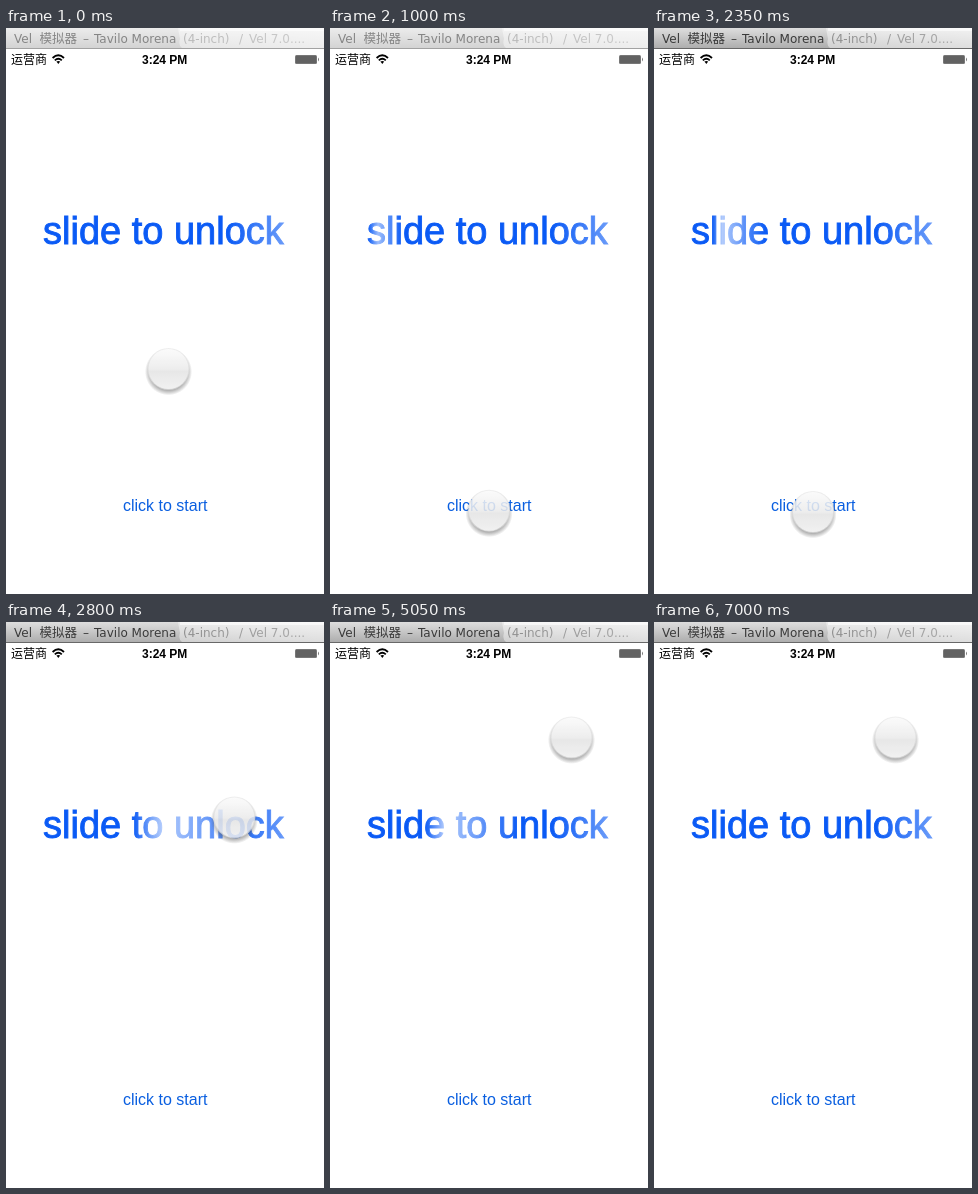
Recreate the animation shown at these times as an HTML page. Size 318 by 566 pixels, loop 7.45 s.

```html
<!DOCTYPE html>
<html lang="zh-CN">
<head>
<meta charset="utf-8">
<title>Slide to unlock</title>
<style>
  html, body { margin: 0; width: 100%; height: 100%; overflow: hidden; background: #fff; }
  svg { position: absolute; left: 0; top: 0; }
  text { font-family: "Liberation Sans", Arial, sans-serif; white-space: pre; }
  .bar text { font: 12px "DejaVu Sans", sans-serif; fill: #858585; }
  .bar .cjk { font: 12.5px "Noto Sans CJK SC", sans-serif; }
  .bar .top { stop-color: #ececec; }
  .bar .low { stop-color: #d2d2d2; }
  .bar .edge { fill: #a2a2a2; }
  .active text { fill: #3a3a3a; }
  .active .top { stop-color: #dedede; }
  .active .low { stop-color: #ababab; }
  .active .edge { fill: #686868; }
  .carrier { font: 12px "Noto Sans CJK SC", sans-serif; }
  .clock { font-size: 12px; font-weight: bold; }
  .start { font-size: 16px; fill: #0a5fe0; }
  .slide { font-size: 38px; fill: url(#shine); stroke: url(#shine); stroke-width: .9; }
</style>
</head>
<body>
<svg width="318" height="566" viewBox="0 0 318 566">
  <defs>
    <linearGradient id="shine" gradientUnits="userSpaceOnUse" x1="38" y1="0" x2="280" y2="0"></linearGradient>
    <linearGradient id="veil" x1="0" x2="1">
      <stop offset="0" stop-color="#fff" stop-opacity=".42"/>
      <stop offset="1" stop-color="#fff" stop-opacity=".6"/>
    </linearGradient>
    <linearGradient id="face" x1="0" y1="0" x2="0" y2="1">
      <stop offset="0" stop-color="#fbfbfb"/>
      <stop offset=".5" stop-color="#ebebeb"/>
      <stop offset=".56" stop-color="#e4e4e4"/>
      <stop offset="1" stop-color="#efefef"/>
    </linearGradient>
    <linearGradient id="rim" x1="0" y1="0" x2="0" y2="1">
      <stop offset="0" stop-color="#ececec"/>
      <stop offset="1" stop-color="#c6c6c6"/>
    </linearGradient>
    <radialGradient id="shadow">
      <stop offset=".76" stop-color="#555" stop-opacity=".6"/>
      <stop offset="1" stop-color="#555" stop-opacity="0"/>
    </radialGradient>
  </defs>

  <g class="bar" id="bar">
    <linearGradient id="metal" x1="0" y1="0" x2="0" y2="1">
      <stop class="top" offset="0"/>
      <stop class="low" offset="1"/>
    </linearGradient>
    <rect width="318" height="21" fill="url(#metal)"/>
    <rect class="edge" y="20" width="318" height="1"/>
    <text x="8" y="15">Vel</text>
    <text class="cjk" x="33.5" y="15">模拟器</text>
    <text x="77" y="15">–</text>
    <text x="88" y="15">Tavilo Morena</text>
    <text x="177" y="15">(4-inch)</text>
    <text x="233" y="15">/</text>
    <text x="243" y="15">Vel 7.0....</text>
    <path d="M172 0H318V20H176Q172 17 174 11Z" fill="url(#veil)"/>
    <rect x="174" width="144" height="3" fill="#fff" opacity=".6"/>
  </g>

  <text class="carrier" x="5" y="36">运营商</text>
  <g fill="none" stroke="#000" stroke-width="1.8">
    <path d="M46.6 30Q52.3 24.6 58 30"/>
    <path d="M48.8 32.4Q52.3 29.2 55.8 32.4"/>
    <path d="M50.4 33.6L52.3 36L54.2 33.6Q52.3 32.2 50.4 33.6Z" fill="#000" stroke="none"/>
  </g>
  <text class="clock" x="136" y="35.5">3:24 PM</text>
  <rect x="289" y="27" width="22" height="9" rx="1.5" fill="#777"/>
  <rect x="290" y="28" width="20" height="7" fill="#626262"/>
  <path d="M312 29.5q2 2 0 4z" fill="#777"/>

  <text class="slide" x="37" y="215.5">slide to unlock</text>
  <text class="start" x="117" y="483">click to start</text>

  <g id="ball" opacity=".86">
    <circle cy="2.8" r="23.6" fill="url(#shadow)"/>
    <circle r="21" fill="url(#rim)"/>
    <circle r="20" fill="url(#face)"/>
  </g>
</svg>
<script>
  const LOOP = 7450, HOLD = 7000, STEP = 50;
  // Each cycle: one pass of rest, then two passes of the band.
  const PASS = 1230, CYCLE = 3 * PASS, LEAD = 260;
  const STOPS = 48, BLUE = [10, 90, 245];
  const bar = document.getElementById("bar");
  const ball = document.getElementById("ball");
  const shine = document.getElementById("shine");
  const clamp = v => Math.max(0, Math.min(1, v));

  const stops = Array.from({ length: STOPS + 1 }, (_, i) => {
    const stop = document.createElementNS("http://www.w3.org/2000/svg", "stop");
    stop.setAttribute("offset", i / STOPS);
    return shine.appendChild(stop);
  });

  // Underdamped step response: 0 before start, settling at 1.
  function spring(ms) {
    if (ms <= 0) return 0;
    const s = ms / 1000, zeta = 0.6, w = 8, damped = w * Math.sqrt(1 - zeta * zeta);
    const wave = Math.cos(damped * s) + zeta * w / damped * Math.sin(damped * s);
    return 1 - Math.exp(-zeta * w * s) * wave;
  }

  const restFade = x => 1 - 0.4 * clamp((x - 0.76) / 0.24);

  // Pale band whose centre and both edges slide right at their own speeds.
  function bandFade(x, p) {
    const left = 0.75 * p, right = 0.1 + 1.65 * p;
    const depth = x < p ? (x - left) / (p - left) : (right - x) / (right - p);
    return 1 - 0.7 * clamp(depth);
  }

  // Blue laid over white with the given strength.
  const tint = a => `rgb(${BLUE.map(c => Math.round(255 + (c - 255) * a))})`;

  function shimmer(t) {
    const phase = (t + LEAD) % CYCLE;
    const moving = phase >= PASS && t < HOLD;
    const p = phase % PASS / PASS;
    stops.forEach((stop, i) => {
      const x = i / STOPS;
      const strength = moving ? Math.min(restFade(x), bandFade(x, p)) : restFade(x);
      stop.setAttribute("stop-color", tint(strength));
    });
  }

  function moveBall(t) {
    const down = spring(t - 30), upX = spring(t - 2530), upY = spring(t - 2550);
    const x = 162.5 - 3.5 * down + 82.5 * upX;
    const y = 341 + 143 * down - 368.5 * upY;
    ball.setAttribute("transform", `translate(${x.toFixed(2)} ${y.toFixed(2)})`);
  }

  function draw(now) {
    const t = Math.floor(now % LOOP / STEP) * STEP;
    bar.classList.toggle("active", t >= 1550);
    shimmer(t);
    moveBall(t);
  }

  const begin = performance.now();
  function tick() {
    draw(performance.now() - begin);
    requestAnimationFrame(tick);
  }
  tick();
</script>
</body>
</html>
```
